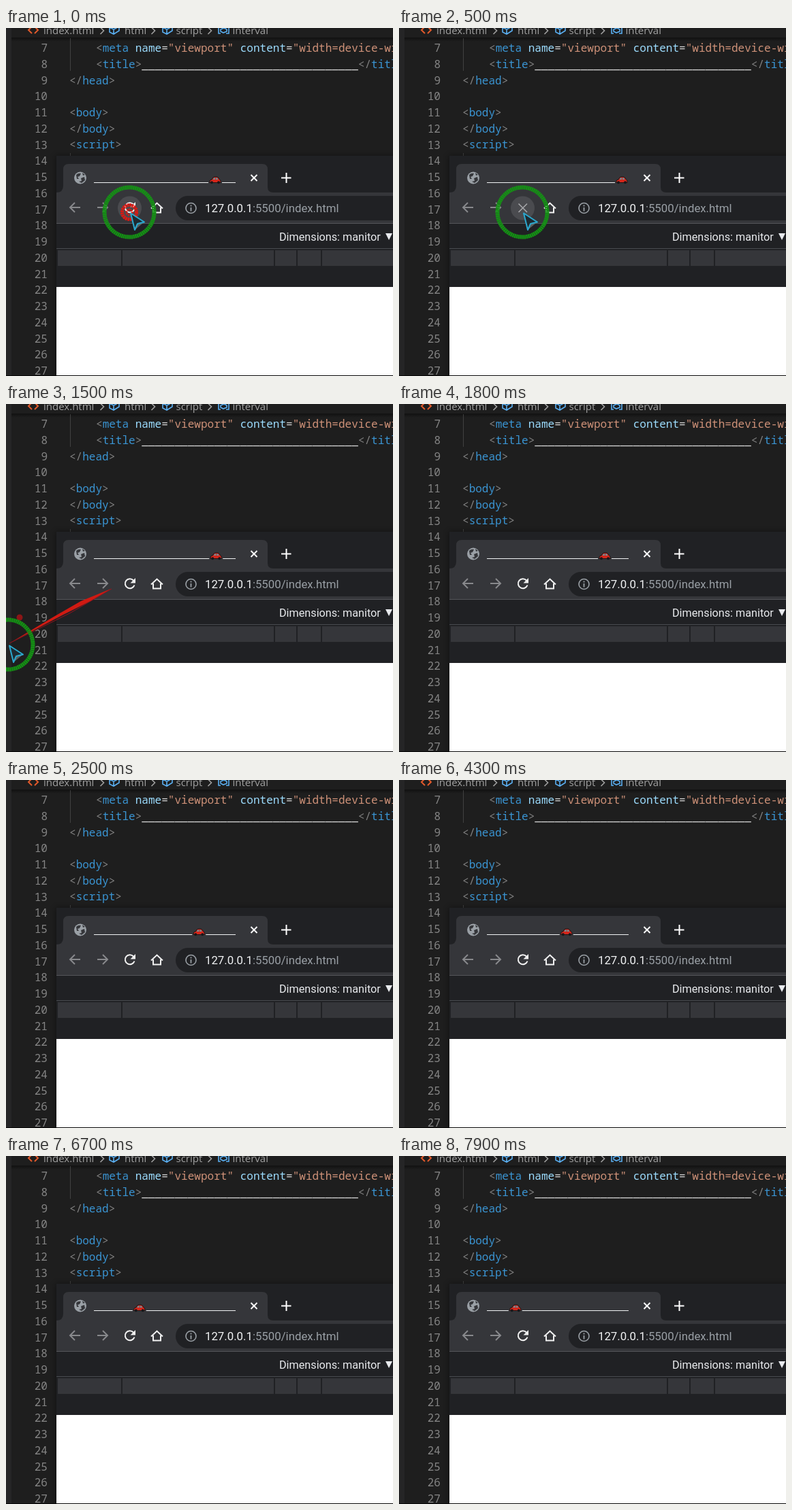
An HTML page for the animation above (8000 ms loop, 568 px wide and 512 px high).

```html
<!DOCTYPE html>
<html lang="en">
<head>
<meta charset="utf-8">
<title>Browser tab animation</title>
<style>
html, body { margin: 0; width: 100%; height: 100%; overflow: hidden; background: #1e1e1e; }
svg { display: block; width: 100vw; height: 100vh; }
text { white-space: pre; }
.code { font: 16.04px "Noto Sans Mono", monospace; fill: #808080; }
.num { fill: #858585; text-anchor: end; }
.tag { fill: #3a94d2; }
.attr { fill: #9cdcfe; }
.str { fill: #ce9178; }
.txt { fill: #d4d4d4; }
.crumb { font: 15px "Open Sans", sans-serif; fill: #a0a0a0; }
.ui { font-family: Roboto, sans-serif; }
.line { fill: none; stroke-width: 2; }
.thin { stroke-width: 1.6; }
</style>
</head>
<body>
<svg viewBox="0 0 568 512" preserveAspectRatio="none">
  <defs>
    <filter id="soft" x="-10%" y="-10%" width="120%" height="120%"><feGaussianBlur stdDeviation="4"/></filter>
    <linearGradient id="shade" x2="0" y2="1">
      <stop stop-color="#000" stop-opacity=".45"/>
      <stop offset="1" stop-color="#000" stop-opacity="0"/>
    </linearGradient>
    <path id="cube" class="line thin" stroke="#5aaef0" d="M-7 -2L1 -6L7 -3V3L-1 8L-7 5ZM-7 -2L-1 1L7 -3M-1 1V8"/>
    <path id="chevron" class="line thin" d="M-2.5 -5L2.5 0L-2.5 5" stroke="#a0a0a0"/>
    <path id="arrow" class="line" d="M8 0H-7M0 -7L-7 0L0 7" stroke="#88898c"/>
  </defs>

  <!-- editor -->
  <rect width="568" height="512" fill="#1e1e1e"/>
  <rect width="8" height="512" fill="#252526"/>
  <rect x="8" y="14" width="560" height="6" fill="url(#shade)"/>
  <path d="M94.5 15V63M94.5 184V190" stroke="#404040"/>
  <g class="crumb">
    <text x="55" y="9">index.html</text>
    <text x="174" y="9">html</text>
    <text x="249.5" y="9">script</text>
    <text x="332.5" y="9">interval</text>
  </g>
  <path class="line" d="M38 -2L33 3L38 8M42 -2L47 3L42 8" stroke="#e0592b"/>
  <use href="#chevron" x="141" y="4"/>
  <use href="#chevron" x="216" y="4"/>
  <use href="#chevron" x="299" y="4"/>
  <use href="#cube" x="159" y="1"/>
  <use href="#cube" x="237" y="1"/>
  <path class="line thin" d="M315 -3H312V8H315M323 8H327V-3H323M315 2L320 0L324 2V5L319 7L315 5Z" stroke="#5aaef0"/>
  <g id="numbers" class="code num"></g>
  <g class="code">
    <text x="132" y="35">&lt;<tspan class="tag">meta</tspan> <tspan class="attr">name</tspan><tspan class="txt">=</tspan><tspan class="str">"viewport"</tspan> <tspan class="attr">content</tspan><tspan class="txt">=</tspan><tspan class="str">"width=device-width</tspan></text>
    <text x="132" y="58.5">&lt;<tspan class="tag">title</tspan>&gt;<tspan class="txt" dy="1">_________________________________</tspan><tspan dy="-1">&lt;/</tspan><tspan class="tag">title</tspan>&gt;</text>
    <text x="93" y="82.5">&lt;/<tspan class="tag">head</tspan>&gt;</text>
    <text x="93" y="130">&lt;<tspan class="tag">body</tspan>&gt;</text>
    <text x="93" y="153.5">&lt;/<tspan class="tag">body</tspan>&gt;</text>
    <text x="93" y="177">&lt;<tspan class="tag">script</tspan>&gt;</text>
  </g>

  <!-- browser window -->
  <rect x="73" y="188" width="520" height="340" opacity=".4" filter="url(#soft)"/>
  <rect x="74" y="188" width="494" height="324" fill="#202124"/>
  <path d="M74 288V242Q84 242 84 232V208Q84 200 92 200H376Q384 200 384 208V234Q384 242 392 242H568V288Z" fill="#35363a"/>
  <rect x="249" y="247" width="360" height="36" rx="18" fill="#202124"/>
  <path d="M74 287.5H568" stroke="#55565a"/>
  <path d="M74 324.5H568" stroke="#494c50"/>
  <rect x="76" y="327" width="492" height="23" fill="#35363a"/>
  <path d="M170 327V350M394 327V350M427 327V350M463 327V350" stroke="#202124" stroke-width="2"/>
  <rect x="74" y="381" width="494" height="130" fill="#fff"/>
  <rect y="511" width="568" height="1" fill="#080808"/>

  <!-- tab and toolbar icons -->
  <circle cx="109" cy="220.5" r="9" fill="#9aa0a6"/>
  <path d="M103 216Q106 213 110 214L108 218L105 219L107 222L104 222ZM110 221L115 219L116 224L111 228L107 226L111 225ZM112 213L116 216L113 217Z" fill="#35363a"/>
  <path class="line" d="M359.5 216L368.5 225M368.5 216L359.5 225M404 220.5H418.5M411.5 213V228" stroke="#fff"/>
  <use href="#arrow" x="101" y="264"/>
  <use href="#arrow" transform="translate(142 264) scale(-1 1)"/>
  <circle id="hover" cx="181.5" cy="265" r="17.5" fill="#4a4b4f"/>
  <g id="reload">
    <path class="line" d="M187 259.5A7 7 0 1 0 188.5 266.5" stroke="#f1f1f1"/>
    <path d="M190 256V263.500H182.500Z" fill="#f1f1f1"/>
  </g>
  <path id="stop" class="line thin" d="M175.5 258.5L188 271M188 258.5L175.5 271" stroke="#a6a7aa"/>
  <path class="line" d="M213 265.5L221.5 257.5L230 265.5M216 264V271.5H227V264" stroke="#f1f1f1"/>
  <circle class="line thin" cx="271.5" cy="265" r="7.5" stroke="#9aa0a6"/>
  <path d="M271.5 260.5V262.5M271.5 264V269.5" stroke="#9aa0a6" stroke-width="1.8"/>
  <text class="ui" x="292" y="271" font-size="16.8" fill="#f1f3f4">127.0.0.1<tspan fill="#9aa0a6">:5500/index.html</tspan></text>
  <text class="ui" x="401" y="313" font-size="16.2" fill="#e8eaed">Dimensions: manitor</text>
  <path d="M557 302H567L562 312Z" fill="#e8eaed"/>

  <!-- tab title -->
  <path id="road" stroke="#f1f3f4"/>
  <g id="car">
    <path d="M-8 3.5V1Q-7.500 -1 -5 -1L-3 -4Q-2 -5 0 -5H2Q4 -5 5 -3L6.5 -1Q8 -.5 8 1.5V3.500Z" fill="#d3271c" stroke="#1b1414"/>
    <path d="M-3.5 -1L-2 -3.5H0V-1ZM1 -1V-3.5H3L4.5 -1Z" fill="#6f8f98"/>
    <circle cx="-5" cy="3.2" r="2" fill="#16171a"/>
    <circle cx="5" cy="3.2" r="2" fill="#16171a"/>
  </g>

  <!-- pointer -->
  <g id="trail">
    <path d="M5 352L70 313L110 290L155 271.5L124 290L84 310Z" fill="#d01a12"/>
    <path d="M5 352L95 307L155 272" fill="none" stroke="#8f1420"/>
    <circle cx="20" cy="314" r="4.5" fill="#8c1616"/>
  </g>
  <g id="pointer">
    <circle r="36.5" fill="none" stroke="#149214" stroke-width="6" stroke-dasharray="2.5 .4"/>
    <g id="click" fill="none" stroke="#e3160f">
      <circle r="10.5" stroke-width="5" stroke-dasharray="2.5 .8"/>
      <circle r="4" stroke-width="3" stroke-dasharray="2 1"/>
    </g>
    <path d="M22 14.500L12 17L8 26Z" fill="#596060"/>
    <path d="M2 1.5L22 14.5L12 17L8 26Z" fill="#1d2a31" stroke="#2ba9cf" stroke-width="2" stroke-linejoin="round"/>
  </g>
</svg>
<script>
const $ = id => document.getElementById(id);
const show = (id, on) => $(id).style.display = on ? '' : 'none';
const LOOP = 8000, STEP = 300, CHAR = 6.25;

for (let n = 7; n <= 27; n++)
  $('numbers').innerHTML += `<text x="61" y="${35 + (n - 7) * 23.75}">${n}</text>`;

// The car restarts on reload, then moves one character per step.
function carX(t) {
  if (t < 300) return 307;
  const start = t < 1300 ? 300 : 400;
  return 327 - CHAR * Math.floor((t - start) / STEP);
}

function pointerAt(t) {
  if (t < 1300) return [181, 271];
  if (t < 1400) return [177, 271];
  if (t < 1500) return [153, 273];
  return t < 1600 ? [3, 354] : [-100, 420];
}

function draw() {
  const t = performance.now() % LOOP;
  const x = carX(t);
  const [px, py] = pointerAt(t);
  const loading = t >= 300 && t < 1200;

  $('road').setAttribute('d', `M129 227.5H${x - 10}M${x + 10} 227.5H337`);
  $('car').setAttribute('transform', `translate(${x} 224)`);
  $('pointer').setAttribute('transform', `translate(${px} ${py})`);
  $('click').setAttribute('transform', `scale(${t < 100 ? 1 : 0.6})`);
  show('click', t < 300);
  show('stop', loading);
  show('reload', !loading);
  show('hover', t < 1400);
  show('trail', t >= 1500 && t < 1600);
  requestAnimationFrame(draw);
}
draw();
</script>
</body>
</html>
```
